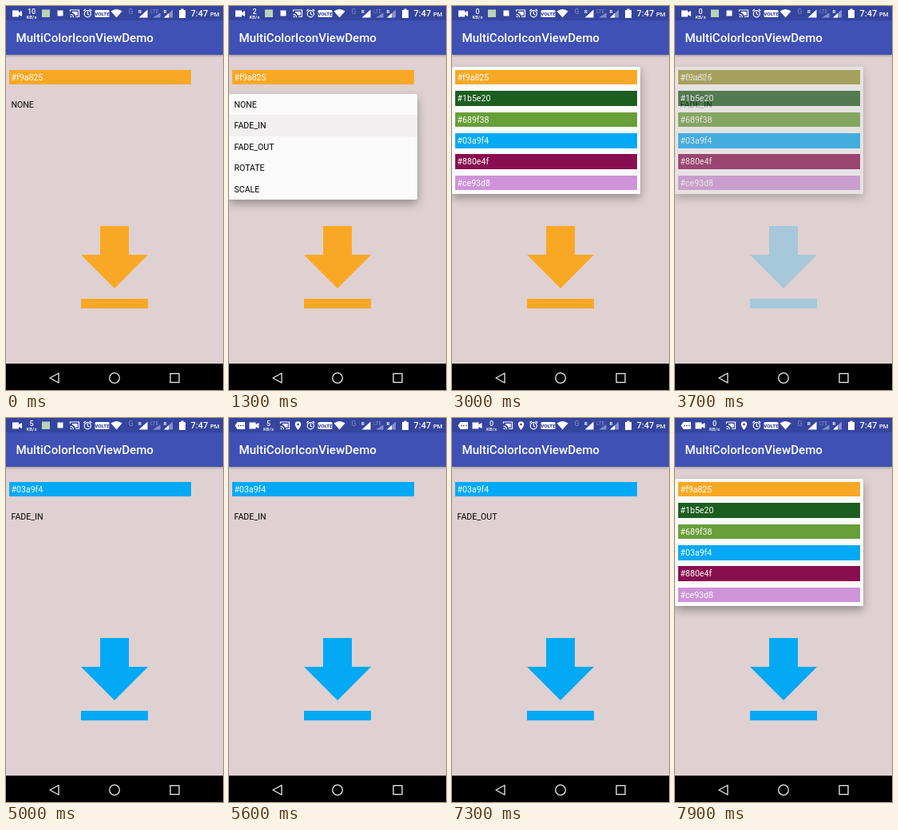
Write an HTML page that moves like this. It is 272 by 480 pixels and loops after 8 s.

```html
<!DOCTYPE html>
<html>
<head>
<meta charset="utf-8">
<style>
html, body { margin: 0; width: 100%; height: 100%; overflow: hidden; }
body { position: relative; background: #dfd1d1; font: 10.58px/20px Roboto, sans-serif; color: #000; }
svg, .bar, .popup, .shade, .field, .color { position: absolute; left: 0; }
.bar { top: 18px; width: 100%; height: 42.5px; background: #3f51b5; box-shadow: 0 1px 3px #0005;
  font-weight: 500; font-size: 15.1px; line-height: 45px; color: #fff; text-indent: 12.5px; }
.field, .color { left: 4px; width: 225.5px; height: 18.5px; padding-left: 2.5px; color: #fff; }
#hue { top: 79.8px; }
#mode { top: 114px; color: #000; }
.popup, .shade { width: 236px; border-radius: 1.5px; }
.popup { background: #fafafa; }
.shade { background: #0003; box-shadow: 0 5px 12px #0005; }
#modes, #modes-shade { top: 110px; height: 132px; }
#colors, #colors-shade { top: 76px; height: 158.5px; }
.mode { height: 26.4px; line-height: 27px; padding-left: 6.5px; }
</style>
</head>
<body>
<div class="bar">MultiColorIconViewDemo</div>
<div id="hue" class="field"></div>
<div id="mode" class="field"></div>

<svg width="272" height="480" viewBox="0 0 272 480" font-family="Roboto, sans-serif" fill="#fff">
  <path id="icon" d="M118 275H154V311H178L136 353L94 311H118ZM94 366H178V378H94Z"/>
  <path d="M0 0H272V18H0Z" fill="#35459e"/>
  <path d="M0 447H272V480H0Z" fill="#000"/>
  <g fill="none" stroke="#eee" stroke-width="1.3">
    <path d="M66 459V471L55 465Z" stroke-linejoin="round"/>
    <circle cx="136" cy="465" r="6.3"/>
    <rect x="206" y="459.5" width="11" height="11"/>
  </g>

  <g id="bubble">
    <path d="M7.5 9.5L10.5 5H20V14H10.5Z"/>
    <path d="M11 9.5H18.5" stroke="#35459e" stroke-width="1.5" stroke-dasharray="1.5"/>
  </g>
  <g id="left">
    <path d="M8 5.5H16V8L20 6V13L16 11V13.5H8Z"/>
    <g text-anchor="middle" font-weight="500">
      <text id="rate" x="32" y="9.5" font-size="9"></text>
      <text x="32" y="16" font-size="6">KB/s</text>
    </g>
  </g>
  <g id="apps">
    <rect x="45" y="4.5" width="10" height="9.5" fill="#b9d2b8"/>
    <rect x="64.5" y="5.5" width="7" height="7"/>
  </g>
  <path id="pin" d="M86.5 15C84.5 12 82.8 10 82.8 8A3.7 3.7 0 0 1 90.2 8C90.2 10 88.5 12 86.5 15ZM86.5 6.7a1.3 1.3 0 1 0 .01 0Z" fill-rule="evenodd"/>
  <g id="cast" fill="none" stroke="#fff" stroke-width="1.2">
    <path d="M80.5 7V5H91.5V13.5H87M80.5 12.8a1.5 1.5 0 0 1 1.5 1.5M80.5 10.3a4 4 0 0 1 4 4"/>
    <path d="M83 7H89.7V11.8H86.5Q85.5 9 83 8.5Z" fill="#fff" stroke="none"/>
  </g>
  <g fill="none" stroke="#fff" stroke-width="1.2">
    <circle cx="102.3" cy="9.7" r="4.1"/>
    <path d="M102.3 7V10L104.3 11.2M97.3 6.2L99.8 4M107.3 6.2L104.8 4"/>
  </g>
  <rect x="111.5" y="5" width="18" height="9" rx="1.5"/>
  <text x="120.5" y="12" font-size="6.2" font-weight="900" text-anchor="middle" fill="#35459e">VOLTE</text>
  <path d="M131.5 6.5Q138.5 1.5 145.5 6.5L138.5 14.5Z"/>
  <g fill="#8490cb">
    <text x="153.5" y="10" font-size="8.5">G</text>
    <text x="181" y="8.5" font-size="6.5">LTE</text>
    <path d="M193.5 8.5V14.5H184Z"/>
    <path d="M209 4.5V14.5H198Z"/>
  </g>
  <path d="M177.5 4.5V14.5H166.5ZM204 9V14.5H198Z"/>
  <text x="166" y="9" font-size="6" font-weight="700">R</text>
  <text x="197.5" y="9" font-size="6" font-weight="700">R</text>
  <path d="M217 5H219.5V3.5H222.5V5H225V15H217Z"/>
  <text x="231.5" y="13" font-size="11" font-weight="500">7:47 <tspan font-size="7.6">PM</tspan></text>
</svg>

<div id="modes-shade" class="shade"></div>
<div id="modes" class="popup"></div>
<div id="colors-shade" class="shade"></div>
<div id="colors" class="popup"></div>

<script>
const $ = id => document.getElementById(id);
const ramp = (t, start, length) => Math.max(0, Math.min(1, (t - start) / length));
const latest = (t, steps) => steps.filter(s => s[0] <= t).pop()[1];
// Opacity of a menu that opens and then fades after a choice
const shown = (t, open, close) => ramp(t, open, 150) * (1 - ramp(t, close, 300));

const ORANGE = '#f9a825', BLUE = '#03a9f4';
const hues = [ORANGE, '#1b5e20', '#689f38', BLUE, '#880e4f', '#ce93d8'];
const modes = ['NONE', 'FADE_IN', 'FADE_OUT', 'ROTATE', 'SCALE'];
const rates = [[0, 10], [900, 2], [2000, 0], [4600, 5], [5700, 1], [7100, 0]];

function addRow(menu, name, label) {
  const row = document.createElement('div');
  row.className = name;
  row.textContent = label;
  return $(menu).appendChild(row);
}
const modeRows = modes.map(m => addRow('modes', 'mode', m));
hues.forEach((hue, i) => {
  const row = addRow('colors', 'color', hue);
  row.style.background = hue;
  row.style.top = 3.8 + i * 26.4 + 'px';
});

function setMenu(id, opacity) {
  $(id).style.opacity = $(id + '-shade').style.opacity = opacity;
}

function draw() {
  const t = performance.now() % 8000;
  const hue = t < 3600 ? ORANGE : BLUE;
  $('hue').textContent = hue;
  $('hue').style.background = hue;
  $('mode').textContent = latest(t, [[0, 'NONE'], [1400, 'FADE_IN'], [6430, 'FADE_OUT']]);
  $('icon').style.fill = hue;
  $('icon').style.opacity = t < 3600 ? 1 : ramp(t, 3600, 400);

  setMenu('modes', Math.max(shown(t, 800, 1400), shown(t, 5800, 6430)));
  setMenu('colors', Math.max(shown(t, 2500, 3600), shown(t, 7400, 9000)));
  modeRows[1].style.background = t > 1200 && t < 1700 ? '#f1eff0' : '';
  modeRows[2].style.background = t > 6350 && t < 6750
    ? 'linear-gradient(90deg, #e9e7e8 126px, #f2f0f1 126px)' : '';

  const late = t >= 5600;
  $('rate').textContent = latest(t, rates);
  $('left').setAttribute('transform', `translate(${late ? 17.5 : 0})`);
  $('cast').setAttribute('transform', `translate(${late ? -16 : 0})`);
  $('bubble').style.display = $('pin').style.display = late ? '' : 'none';
  $('apps').style.display = late ? 'none' : '';
  requestAnimationFrame(draw);
}
draw();
</script>
</body>
</html>
```
